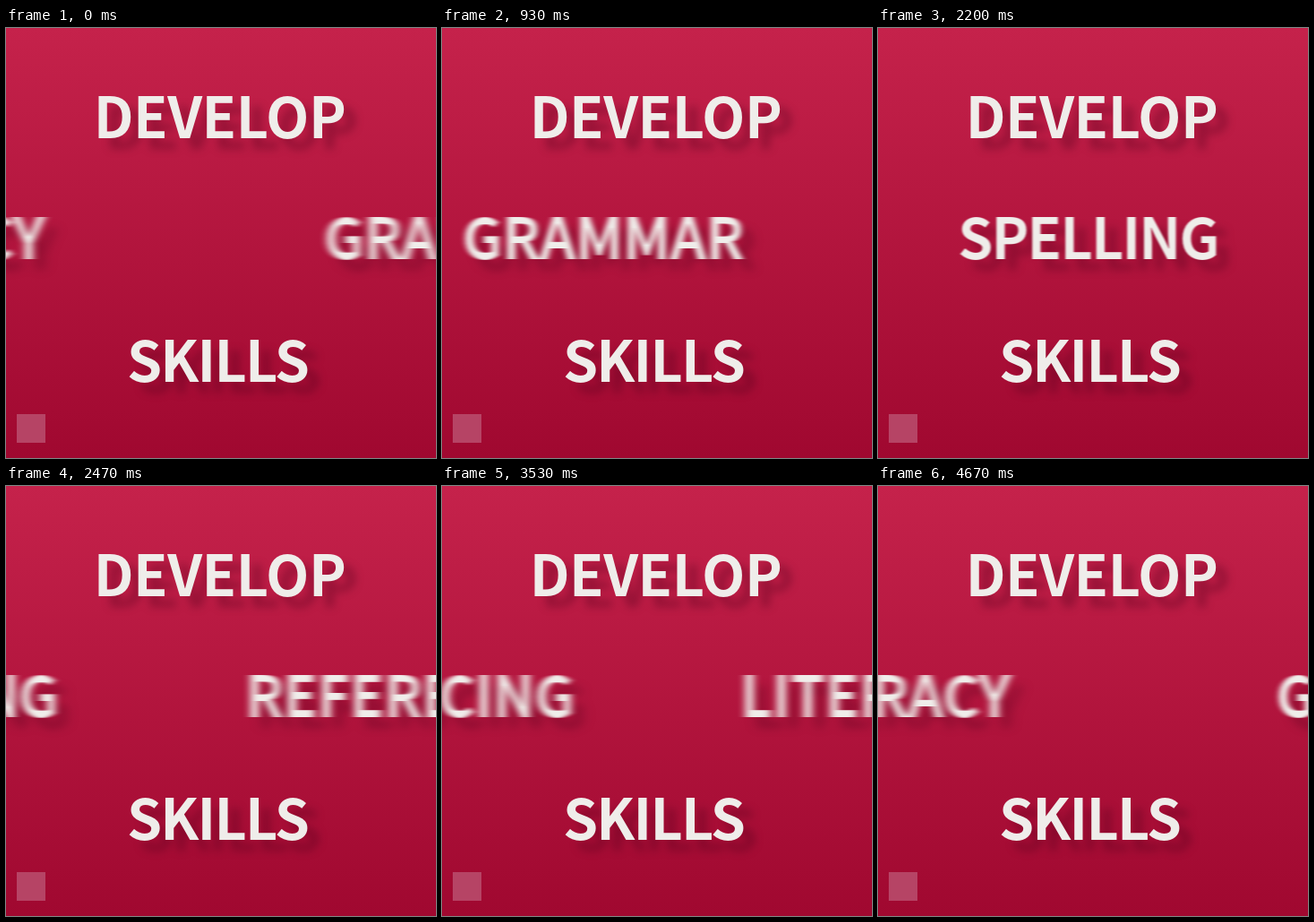
An HTML page for the animation above (4740 ms loop, 480 by 480 pixels).

```html
<!DOCTYPE html>
<html lang="en">
<head>
<meta charset="utf-8">
<title>Develop skills</title>
<style>
  html, body { margin: 0; width: 100%; height: 100%; overflow: hidden; background: #b11440; }
  svg { display: block; width: 100vw; height: 100vh; }
  text {
    font: 700 62.8px "Noto Sans CJK JP", "Noto Sans CJK SC", "Noto Sans CJK", Roboto, sans-serif;
    letter-spacing: -.5px;
    text-anchor: middle;
    fill: #efedea;
  }
  .tight { letter-spacing: -1.8px; }
</style>
</head>
<body>
<svg id="stage" viewBox="0 0 480 480">
  <defs>
    <linearGradient id="bg" x1="0" y1="0" x2="0" y2="1">
      <stop offset="0" stop-color="#c5224b"/>
      <stop offset="1" stop-color="#a00830"/>
    </linearGradient>
    <filter id="still" filterUnits="userSpaceOnUse" x="0" y="0" width="480" height="480" color-interpolation-filters="sRGB">
      <feDropShadow dx="13" dy="12" stdDeviation="5" flood-color="#50001c" flood-opacity=".36"/>
    </filter>
  </defs>
  <rect width="480" height="480" fill="url(#bg)"/>
  <g filter="url(#still)">
    <text x="238.5" y="123">DEVELOP</text>
    <text class="tight" x="236" y="395">SKILLS</text>
  </g>
  <rect x="12" y="431" width="32" height="32" fill="#b64465"/>
</svg>
<script>
const LOOP = 4740, FRAME = 1000 / 15;
const MID = 238.5, BASE = 257.5;
const ENTER = { dist: 440, time: 500 };
const LEAVE = { speed: 1.43, ramp: 130 };

// text, start of entry, start of exit (ms), tracking class
const WORDS = [
  ["GRAMMAR", 4529, 830, ""],
  ["SPELLING", 1058, 2173, "tight"],
  ["REFERENCING", 2235, 3253, ""],
  ["LITERACY", 3297, 4437, ""]
];

const stage = document.getElementById("stage");
const wrap = t => ((t % LOOP) + LOOP) % LOOP;

function make(parent, tag, attrs) {
  const el = document.createElementNS("http://www.w3.org/2000/svg", tag);
  for (const key in attrs) el.setAttribute(key, attrs[key]);
  return parent.appendChild(el);
}

function enterOffset(t) {
  const p = Math.min(1, Math.max(0, t / ENTER.time));
  return ENTER.dist * (1 + Math.cos(Math.PI * p)) / 2;
}

function leaveOffset(t) {
  const { speed, ramp } = LEAVE;
  if (t <= 0) return 0;
  return t < ramp ? speed * t * t / (2 * ramp) : speed * (t - ramp / 2);
}

const movers = WORDS.map(([label, start, end, tracking], i) => {
  const filter = make(stage.querySelector("defs"), "filter", {
    id: "move" + i, filterUnits: "userSpaceOnUse", x: -60, y: 190,
    width: 600, height: 110, "color-interpolation-filters": "sRGB"
  });
  const blur = make(filter, "feGaussianBlur", { stdDeviation: "0 0" });
  make(filter, "feDropShadow", {
    dx: 13, dy: 12, stdDeviation: 5, "flood-color": "#50001c", "flood-opacity": .36
  });
  const group = make(stage, "g", { filter: `url(#move${i})` });
  const text = make(group, "text", { y: BASE, class: tracking });
  text.textContent = label;
  const stay = wrap(end - start);
  const offset = t => enterOffset(t) - leaveOffset(t - stay);
  return { start, offset, blur, group, text };
});

function draw(time) {
  const t = Math.floor((time % LOOP + 4) / FRAME) * FRAME;
  for (const m of movers) {
    const p = wrap(t - m.start);
    const x = m.offset(p);
    const speed = Math.abs(m.offset(p + 8) - m.offset(p - 8)) / 16;
    m.group.style.display = Math.abs(x) > 520 ? "none" : "";
    m.text.setAttribute("x", (MID + x).toFixed(2));
    m.blur.setAttribute("stdDeviation", (speed < .1 ? 0 : speed * 3).toFixed(2) + " 0");
  }
}

let origin;
function tick(now) {
  if (origin === undefined) origin = now;
  draw(now - origin);
  requestAnimationFrame(tick);
}
draw(0);
requestAnimationFrame(tick);
</script>
</body>
</html>
```
